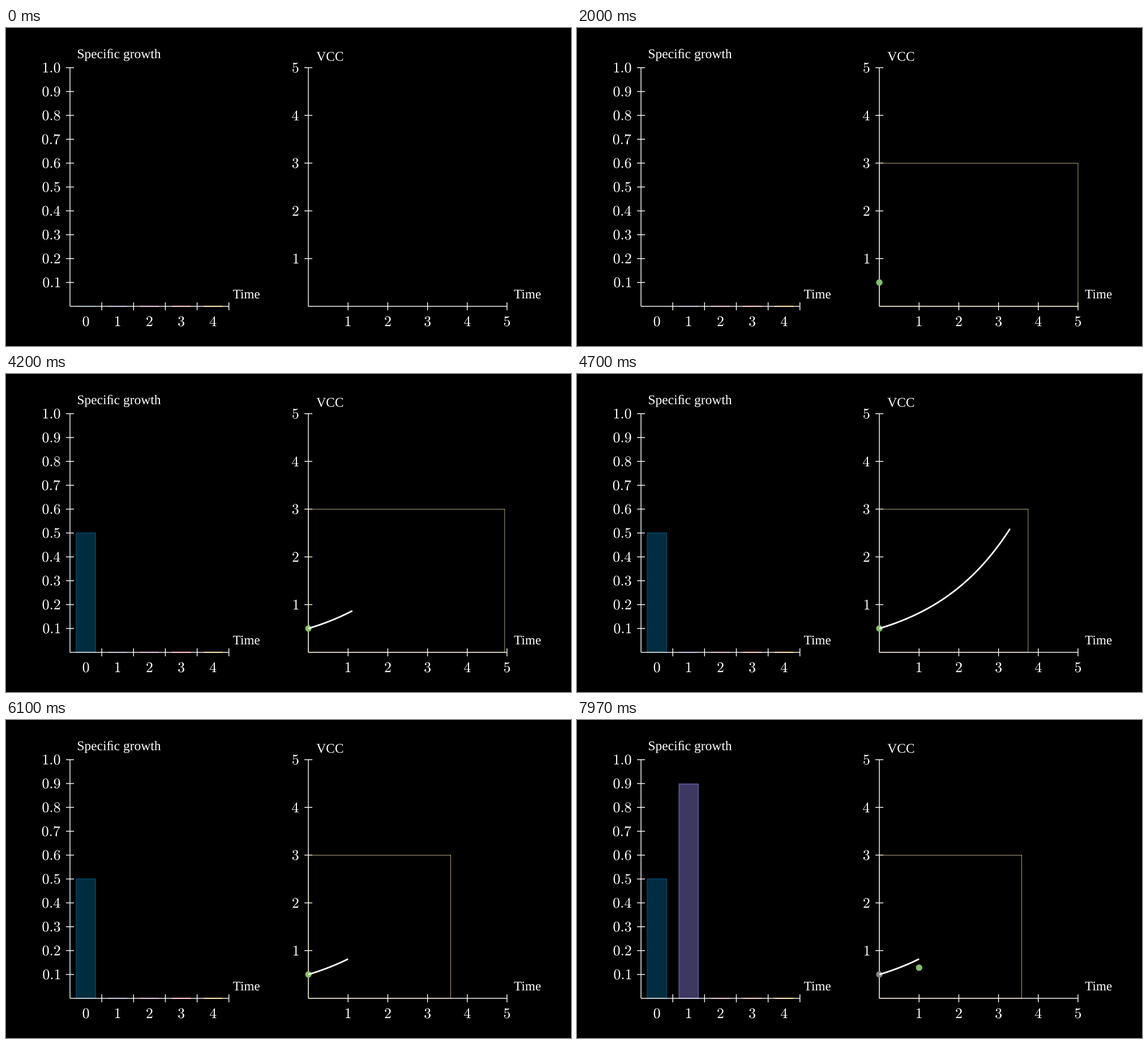
A matplotlib script that plays this animation: 998x561 px, repeating every 8 s.

```python
import numpy as np
import matplotlib.pyplot as plt
from matplotlib.animation import FuncAnimation
from matplotlib.patches import PathPatch, Polygon, Rectangle
from matplotlib.textpath import TextPath
from matplotlib.transforms import Affine2D

plt.rcParams["mathtext.fontset"] = "cm"
plt.rcParams["path.snap"] = False

W, H, DPI = 998, 561, 128
FPS, SECONDS = 30, 8
UNIT = W * 9 / 128                  # pixels per scene unit
BASE, TOP = H / 2 + 3 * UNIT, H / 2 - 3 * UNIT
LEFT, RIGHT = W / 2 - 5.5 * UNIT, W / 2 + 0.5 * UNIT
BIN = 0.8 * UNIT
ROW = (BASE - TOP) / 5
RATE, START, CAP = 0.5, 0.5, 3
T_CAP = np.log(CAP / START) / RATE
GREEN, GREY = np.array([131, 193, 103]) / 255, np.array([136, 136, 136]) / 255
BAR_COLORS = ["#003f5c", "#58508d", "#bc5090", "#ff6361", "#ffa600"]

fig = plt.figure(figsize=(W / DPI, H / DPI), dpi=DPI, facecolor="black")
ax = fig.add_axes([0, 0, 1, 1])
ax.set_xlim(0, W)
ax.set_ylim(H, 0)
ax.axis("off")


def points(pixels):
    return pixels * 72 / DPI


def line(x, y, width, color="white", zorder=2):
    return ax.plot(x, y, color=color, lw=points(width), zorder=zorder,
                   solid_capstyle="butt", solid_joinstyle="miter")[0]


def label(text, x, y, size, anchor, family="Liberation Serif"):
    """Place the ink box of a text; anchor gives the fixed point in it."""
    path = TextPath((0, 0), text, size=size, prop={"family": family})
    box = path.get_extents()
    ax_x = box.x0 + anchor[0] * box.width
    ax_y = box.y0 + anchor[1] * box.height
    move = Affine2D().translate(-ax_x, -ax_y).scale(1, -1).translate(x, y)
    ax.add_patch(PathPatch(move.transform_path(path), fc="white", lw=0, zorder=3))


def number(text, x, y, anchor):
    label(f"${text}$", x, y, 26, anchor)


def axes_lines(x0, length, x_ticks, y_ticks):
    tick, width = 0.1 * UNIT, 0.02 * UNIT
    line([x0, x0 + length], [BASE, BASE], width)
    line([x0, x0], [BASE, TOP], width)
    for x in x_ticks:
        line([x, x], [BASE - tick, BASE + tick], width)
    for y, text in y_ticks:
        line([x0 - tick, x0 + tick], [y, y], width)
        number(text, x0 - 0.25 * UNIT, y, (1, 0.5))


axes_lines(LEFT, 5 * BIN, [LEFT + i * BIN for i in range(1, 6)],
           [(BASE - i * ROW / 2, f"{i / 10:.1f}") for i in range(1, 11)])
axes_lines(RIGHT, 5 * UNIT, [RIGHT + i * UNIT for i in range(1, 6)],
           [(BASE - i * ROW, str(i)) for i in range(1, 6)])
for i in range(5):
    number(i, LEFT + (i + 0.5) * BIN, BASE + 0.25 * UNIT, (0.5, 1))
    number(i + 1, RIGHT + (i + 1) * UNIT, BASE + 0.25 * UNIT, (0.5, 1))

label("Speci\ufb01c growth", 127, 58.3, 23.5, (0, 0))
label("VCC", 548.5, 58.1, 23.5, (0, 0))
label("Time", 401, 477.2, 23.2, (0, 0))
label("Time", 897.5, 477.2, 23.2, (0, 0))

bars = []
for i, color in enumerate(BAR_COLORS):
    bar = Rectangle((LEFT + (i + 0.2) * BIN, BASE), 0.6 * BIN, 0, fc=(color, 0.7),
                    ec=color, lw=points(0.03 * UNIT), joinstyle="miter", zorder=1)
    bars.append(ax.add_patch(bar))

frame_box = line([], [], 0.0095 * UNIT, "#FFF1B6", zorder=4)
first_dot = ax.add_patch(Polygon([(0, 0)] * 3, lw=0, zorder=5))
second_dot = ax.add_patch(Polygon([(0, 0)] * 3, lw=0, fc=GREEN, zorder=5))
curve = line([], [], 0.04 * UNIT, zorder=6)


def smooth(t):
    sigmoid = lambda v: 1 / (1 + np.exp(-v))
    low = sigmoid(-5)
    return np.clip((sigmoid(10 * (t - 0.5)) - low) / (1 - 2 * low), 0, 1)


def to_px(t, value):
    return RIGHT + t * UNIT, BASE - value * ROW


def draw_box(width, part):
    """Trace the rectangle from its upper right corner, one quarter per side."""
    corners = np.array([(width, CAP), (0, CAP), (0, 0), (width, 0), (width, CAP)])
    stops = np.arange(5) / 4
    s = np.append(stops[stops < part], part)
    frame_box.set_data(*to_px(np.interp(s, stops, corners[:, 0]),
                              np.interp(s, stops, corners[:, 1])))
    frame_box.set_visible(part > 0)


def draw_dot(dot, t, value, part):
    a = np.linspace(0, 2 * np.pi * part, 60)
    x, y = to_px(t, value)
    r = 0.08 * UNIT
    dot.set_xy(np.column_stack([x + r * np.cos(a), y - r * np.sin(a)]))
    dot.set_visible(part > 0)


def update(n):
    phase = lambda second: smooth(np.clip(n / FPS - second, 0, 1))

    for bar, value, second in ((bars[0], 0.5, 2), (bars[1], 0.9, 7)):
        bar.set_height(-value * 5 * 2 * phase(second) * ROW / 5 * 2.5)
        bar.set_visible(n != second * FPS)

    draw_box(5 + (T_CAP - 5) * phase(4), phase(0))

    draw_dot(first_dot, 0, START, phase(1))
    first_dot.set_facecolor(GREEN + (GREY - GREEN) * phase(6))
    draw_dot(second_dot, 1, START * np.exp(RATE / 2), phase(6))

    # the curve appears up to 1, reaches the cap and returns to 1
    end = phase(3) + (T_CAP - 1) * (phase(4) - phase(5))
    t = np.linspace(0, end, 80)
    curve.set_data(*to_px(t, START * np.exp(RATE * t)))
    curve.set_visible(end > 0)
    return [*bars, frame_box, first_dot, second_dot, curve]


anim = FuncAnimation(fig, update, frames=FPS * SECONDS, interval=1000 / FPS,
                     repeat=True, repeat_delay=0, blit=False)
plt.show()
```
